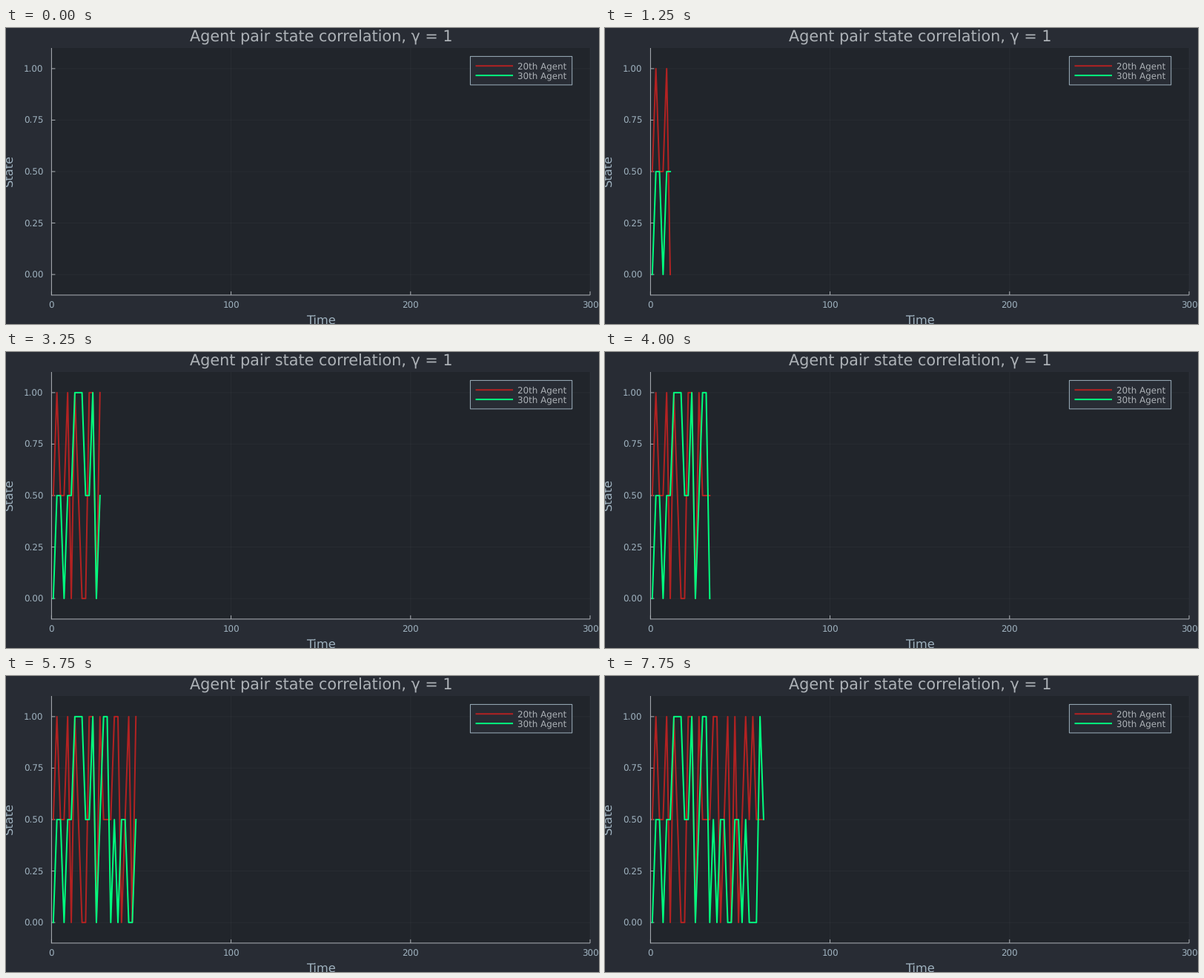
Write a matplotlib script that moves like this. It is 800x400 px and loops after 8 s.

```python
import matplotlib.pyplot as plt
from matplotlib.animation import FuncAnimation
from matplotlib.patches import Rectangle

plt.rcParams.update({"font.family": "DejaVu Sans", "text.hinting": "none",
                     "path.snap": False})

W, H = 800, 400
LEFT, RIGHT, TOP, BOTTOM = 61.4, 788, 27, 360.9
OUTER, INNER = "#282C34", "#21252B"
LINE, LABEL = "#ADB2B7", "#9EB1BE"
RED, GREEN = "#B22222", "#00FF7F"
SMALL, MEDIUM, LARGE = 11.83, 16.27, 20.7

# One digit per sample, in half units of state
RED_STATES = "12112021002202111220120201212111"
GREEN_STATES = "01101122211201220101100110100021"


def px(t):
    return LEFT + t * (RIGHT - LEFT) / 300


def py(state):
    return 333.1 - 278.2 * state


# At 72 dpi one point equals one pixel
fig = plt.figure(figsize=(W / 72, H / 72), dpi=72, facecolor=OUTER)
ax = fig.add_axes([0, 0, 1, 1])
ax.set_xlim(0, W)
ax.set_ylim(H, 0)
ax.axis("off")


def segment(x0, y0, x1, y1, color=LINE, width=1, **kw):
    ax.plot([x0, x1], [y0, y1], color=color, lw=width,
            solid_capstyle="butt", **kw)


def label(x, y, text, size=SMALL, color=LABEL, ha="center", **kw):
    ax.text(x, y, text, fontsize=size, color=color, ha=ha,
            va="baseline", rotation_mode="anchor", **kw)


def draw_axes():
    ax.add_patch(Rectangle((LEFT, TOP), RIGHT - LEFT, BOTTOM - TOP,
                           facecolor=INNER, lw=0))
    for t in (0, 100, 200, 300):
        x = px(t)
        segment(x, TOP, x, BOTTOM, alpha=0.05)
        segment(x, BOTTOM, x, BOTTOM - 5)
        label(x, 379, str(t))
    for i in range(5):
        y = py(i / 4)
        segment(LEFT, y, RIGHT, y, alpha=0.05)
        segment(LEFT, y, LEFT + 5, y)
        label(50.5, y + 4.8, f"{i / 4:.2f}", ha="right")
    segment(LEFT, TOP, LEFT, BOTTOM + 0.5)
    segment(LEFT, BOTTOM, RIGHT, BOTTOM)

    label(425.3, 19, "Agent pair state correlation, γ = 1", LARGE, LINE)
    label(425, 400, "Time", MEDIUM)
    label(9.5, 192.5, "State", MEDIUM, rotation=90)


def draw_legend():
    ax.add_patch(Rectangle((626.4, 38.4), 137.3, 38.5, facecolor=OUTER,
                           edgecolor=LABEL, lw=1, zorder=5))
    for y, color, name in ((51.2, RED, "20th Agent"),
                           (64.1, GREEN, "30th Agent")):
        segment(633.5, y, 684, y, color, 2, zorder=6)
        label(690, y + 4.5, name, color=LINE, ha="left", zorder=6)


def trace(color):
    return ax.plot([], [], color=color, lw=2, solid_joinstyle="round",
                   solid_capstyle="projecting", zorder=4)[0]


draw_axes()
draw_legend()
series = [(trace(RED), RED_STATES), (trace(GREEN), GREEN_STATES)]


def update(step):
    # A lone first sample has no segment to draw
    count = step + 1 if step else 0
    xs = [px(1 + 2 * k) for k in range(count)]
    for line, states in series:
        line.set_data(xs, [py(int(s) / 2) for s in states[:count]])
    return [line for line, _ in series]


anim = FuncAnimation(fig, update, frames=len(RED_STATES), interval=250,
                     repeat=True, repeat_delay=0)
plt.show()
```
